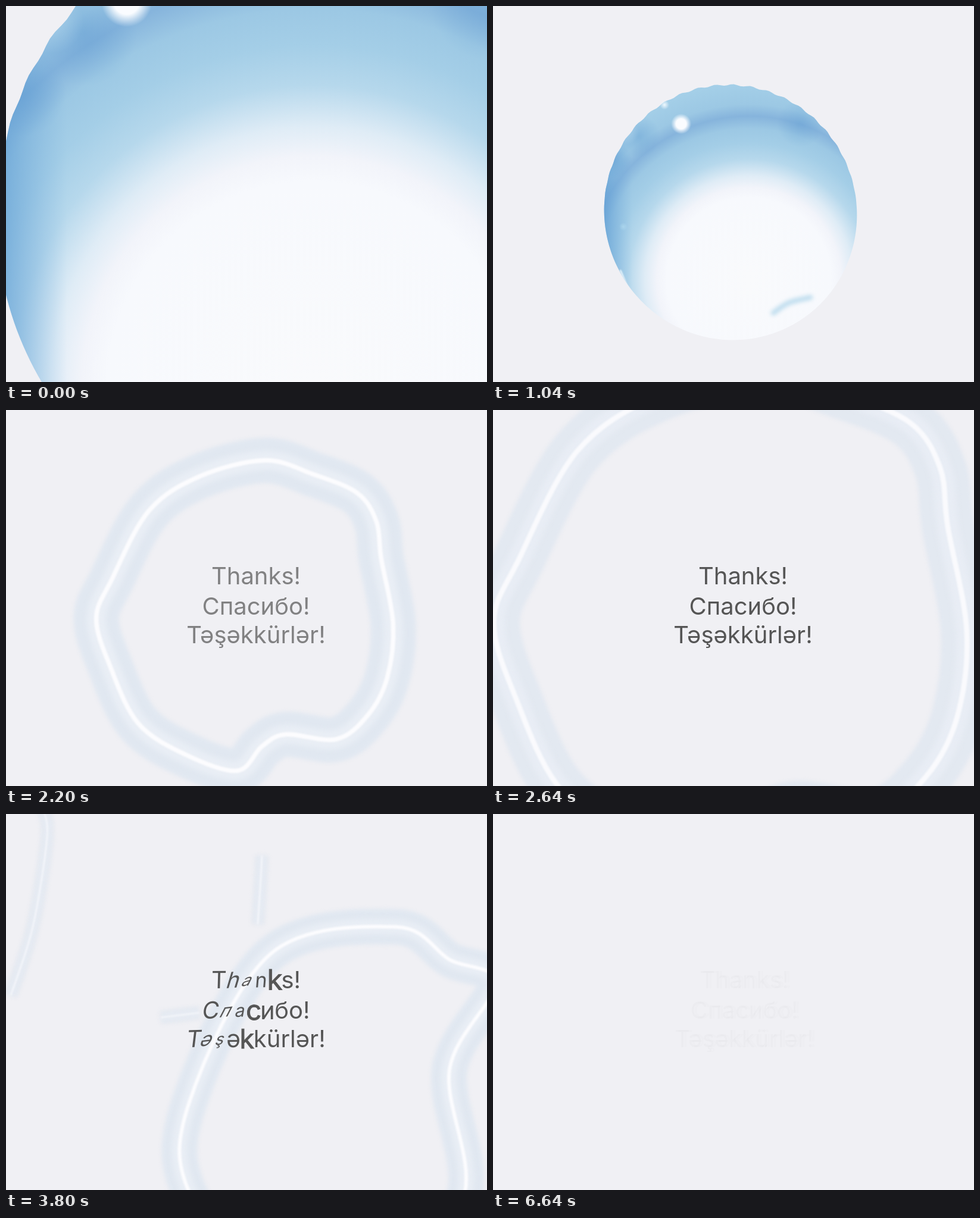
An HTML page with a canvas that plays this animation: 808x632 px, repeating every 6680 ms.

```html
<!DOCTYPE html>
<html lang="en">
<head>
<meta charset="utf-8">
<title>Thanks</title>
<style>
html, body { margin: 0; width: 100%; height: 100%; overflow: hidden; background: #f0f0f4; }
canvas { display: block; }
</style>
</head>
<body>
<canvas id="stage" width="808" height="632"></canvas>
<script>
const ctx = document.getElementById('stage').getContext('2d');
const LOOP = 6680, BG = '#f0f0f4';
const LINES = [['Thanks!', 293], ['Спасибо!', 344], ['Təşəkkürlər!', 392]];

const clamp = v => Math.max(0, Math.min(1, v));
const mix = (a, b, u) => a + (b - a) * u;
const ramp = (t, a, b) => clamp((t - a) / (b - a));
const span = (t, a, b, c, d) => ramp(t, a, b) * (1 - ramp(t, c, d));
const bump = (d, center, width) => Math.exp(-(((d - center) / width) ** 2));
const pairs = s => s.split(' ').map(p => p.split(',').map(Number));
const scaleAt = (pts, cx, cy, k) => pts.map(([x, y]) => [cx + (x - cx) * k, cy + (y - cy) * k]);

const splash = pairs('435,85 515,108 590,140 622,188 630,250 650,360 640,450 608,512 555,553 470,545 430,565 388,606 300,578 222,526 175,430 152,350 178,285 240,170 325,112');
const ringNear = pairs('625,357 690,378 745,440 785,540 765,600 650,628 550,640 505,560 495,485 560,410');
const ringWide = pairs('655,190 745,245 822,285 745,430 770,640 650,800 450,800 310,640 308,485 445,235');
const ringTop = pairs('95,0 200,-35 300,0 326,90 290,165 220,215 140,222 50,170 45,100');
const earlyThreads = [
  '190,118 360,108 560,108 680,82 720,22', '680,82 740,56 808,42', '700,80 690,120 640,220 616,290 612,335',
  '175,390 190,440 180,520 152,600 145,640', '145,632 200,602 260,590', '380,575 410,537 465,524'
].map(pairs);
const lateThreads = ['62,-10 69,40 45,190 8,305', '430,70 428,110 423,185', '260,342 325,334'].map(pairs);
// x, y, radius
const drops = pairs('72,5,14 38,51,11 86,97,14 60,142,16 92,132,7 625,12,15 741,114,26 637,413,12 695,422,20');

// Catmull-Rom curve through the points
function trace(pts, closed) {
  const n = pts.length;
  const at = i => closed ? pts[(i + n) % n] : pts[Math.max(0, Math.min(n - 1, i))];
  ctx.beginPath();
  ctx.moveTo(...pts[0]);
  for (let i = 0; i < (closed ? n : n - 1); i++) {
    const [a, b, c, d] = [at(i - 1), at(i), at(i + 1), at(i + 2)];
    ctx.bezierCurveTo(b[0] + (c[0] - a[0]) / 6, b[1] + (c[1] - a[1]) / 6,
      c[0] - (d[0] - b[0]) / 6, c[1] - (d[1] - b[1]) / 6, c[0], c[1]);
  }
}

function water(pts, width, alpha, closed = true) {
  if (alpha <= 0) return;
  ctx.save();
  ctx.globalAlpha = alpha;
  ctx.lineJoin = 'round';
  trace(pts, closed);
  for (const [part, color, blur] of [[1, '#e1e8f1', 3], [.42, '#e9eef5', 5], [.1, '#fcfcfe', 1.5]]) {
    ctx.filter = `blur(${blur}px)`;
    ctx.lineWidth = width * part;
    ctx.strokeStyle = color;
    ctx.stroke();
  }
  ctx.restore();
}

function blob(x, y, r, rgb, alpha, core = 0) {
  const g = ctx.createRadialGradient(x, y, r * core, x, y, r);
  g.addColorStop(0, `rgba(${rgb},${alpha})`);
  g.addColorStop(1, `rgba(${rgb},0)`);
  ctx.fillStyle = g;
  ctx.fillRect(x - r, y - r, 2 * r, 2 * r);
}

function bubble(t) {
  const alpha = 1 - ramp(t, 1480, 1660);
  if (!alpha) return;
  const u = ramp(t, 0, 1040), after = ramp(t, 1040, 1640);
  const s = mix(2.5, 1, u) - .4 * after;
  ctx.save();
  ctx.globalAlpha = alpha;
  ctx.translate(mix(515, 399, u) + 8 * after, mix(365, 347, u));
  ctx.scale(s, s);

  ctx.save();
  ctx.beginPath();
  for (let i = 0; i <= 240; i++) {
    const a = i / 240 * Math.PI * 2;
    const r = 1 + .006 * Math.sin(a * 44 + t / 150) * Math.max(0, -Math.sin(a)) + .012 * Math.sin(2 * a + .6);
    ctx.lineTo(Math.cos(a) * 211 * r, Math.sin(a) * 216 * r);
  }
  ctx.clip();
  const gx = mix(0, 31, u), gy = mix(110, 113, u);
  const g = ctx.createRadialGradient(gx, gy, 0, gx, gy, 340);
  const tones = [[0, '#f9fafc'], [138, '#f7f9fd'], [155, '#f2f4fa'], [175, '#dfecf6'], [203, '#b6d8ec'],
    [230, '#a4cee7'], [254, '#9cc8e4'], [275, '#86b4dc'], [295, '#9cc8e4'], [330, '#a4cfe8']];
  for (const [r, color] of tones) g.addColorStop(r / 340, color);
  ctx.fillStyle = g;
  ctx.fillRect(-230, -230, 460, 460);

  const edge = ctx.createLinearGradient(-211, 0, -165, 0);
  edge.addColorStop(0, 'rgba(96,158,212,.7)');
  edge.addColorStop(1, 'rgba(120,175,220,0)');
  ctx.fillStyle = edge;
  ctx.fillRect(-230, -230, 70, 460);
  blob(-196, -88, 30, '90,152,208', .4);
  blob(-154, -128, 36, '90,152,208', .4);
  blob(-176, -136, 22, '200,228,244', .4);
  blob(118, -150, 40, '90,152,208', .35);

  // light bent along the lower rim
  ctx.lineCap = 'round';
  ctx.globalAlpha = alpha * u;
  ctx.filter = 'blur(3px)';
  ctx.strokeStyle = '#c3dfef';
  ctx.lineWidth = 9;
  trace([[72, 169], [98, 152], [134, 143]], false);
  ctx.stroke();
  ctx.filter = 'blur(1px)';
  ctx.strokeStyle = '#e8f4fb';
  ctx.lineWidth = 3;
  trace([[-185, 98], [-150, 166], [-82, 207]], false);
  ctx.stroke();
  ctx.restore();

  blob(mix(-125, -83, u), -149, 17, '250,252,255', 1, .5);
  blob(-111, -181, 8, '240,249,254', u);
  blob(-180, 24, 7, '170,212,236', u);
  ctx.restore();
}

function droplet(x, y, r, alpha) {
  ctx.save();
  ctx.globalAlpha = alpha;
  ctx.translate(x, y);
  ctx.scale(r / 20, r / 20);
  blob(-2, 3, 23, '205,219,229', .75, .4);
  blob(2, -2, 17, '241,244,248', 1, .55);
  ctx.lineWidth = 2;
  ctx.strokeStyle = '#d3dfe7';
  ctx.beginPath();
  ctx.arc(1, -1, 17, 2.4, 5.6);
  ctx.stroke();
  ctx.restore();
}

function bigDrop(x, y, k, alpha) {
  ctx.save();
  ctx.globalAlpha = alpha;
  ctx.translate(x, y);
  ctx.scale(k, k);
  blob(18, 32, 52, '196,210,224', .65, .2);
  const g = ctx.createRadialGradient(4, 8, 8, 0, 0, 49);
  g.addColorStop(0, '#e9eff5');
  g.addColorStop(.75, '#e3ebf2');
  g.addColorStop(1, '#d0dee8');
  ctx.fillStyle = g;
  ctx.beginPath();
  ctx.ellipse(0, 0, 47, 49, 0, 0, 7);
  ctx.fill();
  ctx.filter = 'blur(1.5px)';
  ctx.strokeStyle = '#bfd0df';
  ctx.lineWidth = 8;
  trace([[-31, 22], [-24, -5], [-3, -20], [25, -8], [38, 10]], false);
  ctx.stroke();
  ctx.lineWidth = 6;
  trace([[-3, -27], [-2, -4], [3, 16]], false);
  ctx.stroke();
  ctx.strokeStyle = '#fafcfe';
  ctx.lineWidth = 3;
  ctx.beginPath();
  ctx.arc(0, 0, 43, .6, 2.2);
  ctx.stroke();
  blob(-31, -19, 9, '255,255,255', .9);
  ctx.restore();
}

// Letters bend and resize as the water line sweeps past them
function letters(t, shift) {
  const line = 365 - .328 * (t - 3800);
  for (const [text, base] of LINES) {
    const left = 420 - ctx.measureText(text).width / 2 + shift;
    const front = line + (392 - base) * .55;
    const passing = span(t, 3100, 3300, 4150, 4350);
    [...text].forEach((ch, i) => {
      const w = ctx.measureText(ch).width;
      const x = left + ctx.measureText(text.slice(0, i + 1)).width - w / 2;
      const d = x - front;
      const size = 1 + passing * (.2 * bump(d, 30, 15) - .32 * bump(d, -8, 22));
      const lean = -.4 * passing * bump(d, -22, 24);
      ctx.save();
      ctx.translate(x, base - 13);
      ctx.transform(size, 0.25 * lean, lean, size, 0, 0);
      ctx.fillText(ch, -w / 2, 13);
      if (size > 1.05) ctx.strokeText(ch, -w / 2, 13);
      ctx.restore();
    });
  }
}

function caption(t) {
  const out = ramp(t, 6160, 6640);
  const alpha = ramp(t, 1700, 2400) * (1 - .975 * out);
  if (!alpha) return;
  ctx.save();
  ctx.font = '40px Inter, "Open Sans", sans-serif';
  ctx.fillStyle = ctx.strokeStyle = out > .5 ? '#6a5c4c' : '#555';
  ctx.lineWidth = .8;
  ctx.globalAlpha = alpha;
  letters(t, out * 2);
  if (out) {
    ctx.globalAlpha = alpha * out * .5;
    letters(t, out * 7);
  }
  const touch = span(t, 3090, 3150, 3180, 3240);
  if (touch) {
    ctx.globalAlpha = touch;
    ctx.fillStyle = BG;
    ctx.fillRect(528, 386, 10, 8);
    ctx.fillStyle = '#4a515a';
    ctx.beginPath();
    ctx.ellipse(537, 394, 8, 3.5, .65, 0, 7);
    ctx.fill();
  }
  ctx.restore();
}

function draw(t) {
  ctx.fillStyle = BG;
  ctx.fillRect(0, 0, 808, 632);
  bubble(t);

  const k = Math.max(.1, 1 + (t - 2200) * .00135);
  water(scaleAt(splash, 405, 340, k), 76 * Math.min(k, 1.15), span(t, 1540, 1700, 2600, 3000));

  const u = (t - 3160) / 640;
  const thread = (list, alpha, dx) => list.forEach(p =>
    water(p.map(([x, y]) => [x + dx, y]), 22, alpha * .8, false));
  thread(earlyThreads, span(t, 2700, 3050, 3250, 3600), -50 * u);
  thread(lateThreads, span(t, 3450, 3750, 3900, 4300), -50 * (u - 1));

  const grow = Math.max(.1, 1 + .75 * u);
  const top = scaleAt(ringTop, 185, 100, grow).map(([x, y]) => [x - 260 * u, y - 260 * u]);
  water(top, 70 * Math.min(grow, 1), span(t, 2650, 2950, 3350, 3740));
  const side = u < 0
    ? scaleAt(ringNear, 640, 500, Math.max(.1, 1 + u))
    : ringNear.map(([x, y], i) => [mix(x, ringWide[i][0], u), mix(y, ringWide[i][1], u)]);
  water(side, u < 0 ? 80 * Math.max(.2, 1 + u) : mix(80, 60, clamp(u)), span(t, 2650, 2950, 4150, 4600));

  const here = span(t, 4450, 4900, 5700, 6560);
  if (here) {
    const size = mix(1.35, 1, ramp(t, 4450, 5280)) * mix(1, .6, ramp(t, 5280, 6560));
    const spread = mix(1.12, 1, ramp(t, 4450, 5280));
    for (const [x, y, r] of drops) {
      droplet(404 + (x - 404) * spread, 316 + (y - 316) * spread, r * size, here);
    }
    bigDrop(404 - 262 * spread, 316 + 48 * spread, size, here);
  }
  caption(t);
}

const start = performance.now();
(function frame() {
  draw((performance.now() - start) % LOOP);
  requestAnimationFrame(frame);
})();
</script>
</body>
</html>
```
